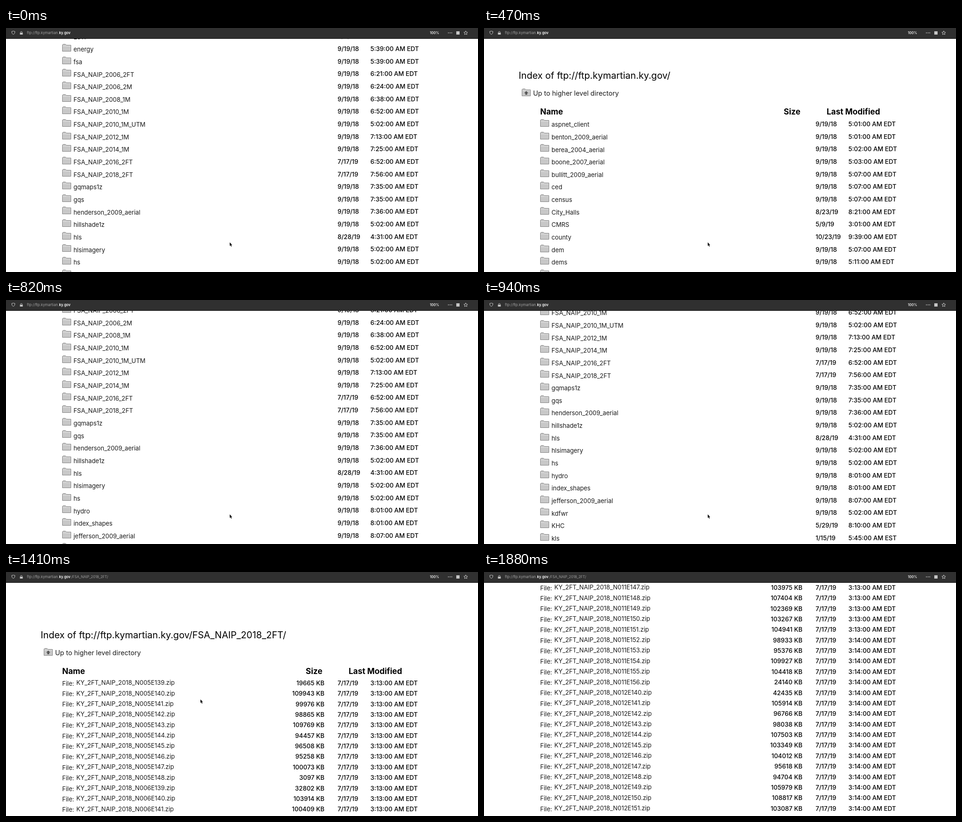
An HTML page with a canvas that plays this animation: 1000 px wide and 519 px high, repeating every 2.94 s.

```html
<!DOCTYPE html>
<html lang="en">
<head>
<meta charset="utf-8">
<title>Directory listing</title>
<style>
html, body { margin: 0; width: 100%; height: 100%; overflow: hidden; background: #fff; }
canvas { display: block; width: 1000px; height: 519px; }
</style>
</head>
<body>
<canvas id="stage" width="1000" height="519"></canvas>
<script>
const ctx = document.getElementById('stage').getContext('2d');
const LOOP = 2940, TICK = LOOP / 50, BAR = 23, FONT = 'Inter, Roboto, sans-serif';
const INK = '#000', LINK = '#1a1a1a', PALE = '#c4c4c4';
const ROOT = 'ftp.kymartian.', HOST = 'ky.gov', FOLDER = 'FSA_NAIP_2018_2FT';

// name, time, optional date, optional zone
const folders = `aspnet_client 5:01
benton_2009_aerial 5:01
berea_2004_aerial 5:02
boone_2007_aerial 5:03
bullitt_2009_aerial 5:07
ced 5:07
census 5:07
City_Halls 8:21 8/23/19
CMRS 3:01 5/9/19
county 9:39 10/23/19
dem 5:07
dems 5:11
dlg 5:02
doq 5:02
doqcnty 5:02
doqq2002 5:02
doqsid 5:02
doq_phase2_sid 5:01
dor 5:35
drg 5:02
drg100k 5:39
drg250k 5:02
drg_utm 5:02
E911 7:49 9/3/19
energy 5:39
fsa 5:39
FSA_NAIP_2006_2FT 6:21
FSA_NAIP_2006_2M 6:24
FSA_NAIP_2008_1M 6:38
FSA_NAIP_2010_1M 6:52
FSA_NAIP_2010_1M_UTM 5:02
FSA_NAIP_2012_1M 7:13
FSA_NAIP_2014_1M 7:25
FSA_NAIP_2016_2FT 6:52 7/17/19
FSA_NAIP_2018_2FT 7:56 7/17/19
gqmaps1z 7:35
gqs 7:35
henderson_2009_aerial 7:36
hillshade1z 5:02
hls 4:31 8/28/19
hlsimagery 5:02
hs 5:02
hydro 8:01
index_shapes 8:01
jefferson_2009_aerial 8:07
kdfwr 5:02
KHC 8:10 5/29/19
kls 5:45 1/15/19 EST`.split('\n').map(line => {
  const [name, time, date = '9/19/18', zone = 'EDT'] = line.split(' ');
  return { name, date, time: `${time}:00 AM ${zone}` };
});

// Map tiles: each band to the north reaches a little further east; border tiles are small
function buildFiles() {
  const list = [];
  let seed = 7;
  for (let north = 5; north <= 12; north++) {
    const first = Math.max(139, north + 128);
    const last = Math.round(152 + (north - 8) * 4 / 3);
    for (let east = first; east <= last; east++) {
      seed = (seed * 16807) % 2147483647;
      const border = east === first || east === last;
      const size = border ? 16 + seed % 49000 : 93700 + seed % 16500;
      const minute = north * 1000 + east > 11151 ? 14 : 13;
      list.push({
        name: `KY_2FT_NAIP_2018_N${String(north).padStart(3, '0')}E${east}.zip`,
        size: size + ' KB',
        date: '7/17/19',
        time: `3:${minute}:00 AM EDT`
      });
    }
  }
  return list;
}
const files = buildFiles();

// Key points: [tick, value, ...], straight between them
const folderScroll = [[2, 799.6], [5, -33], [7, -33], [8, 0], [11, 561.7], [14, 876], [16, 950.8]];
const fileScroll = [[25, -33], [28, 974], [32, 2139.5]];
const pointer = [[16, 474, 456], [20, 240, 151], [22, 240, 151], [25, 498, 331]];
const OPEN = 22, END = 32;

function track(keys, tick) {
  const next = keys.findIndex(k => k[0] > tick);
  if (next === 0) return keys[0].slice(1);
  if (next < 0) return keys[keys.length - 1].slice(1);
  const a = keys[next - 1], b = keys[next], u = (tick - a[0]) / (b[0] - a[0]);
  return a.map((v, i) => v + (b[i] - v) * u).slice(1);
}

function text(str, x, y, size, color = INK, weight = 400, align = 'left') {
  ctx.font = `${weight} ${size}px ${FONT}`;
  ctx.fillStyle = color;
  ctx.textAlign = align;
  ctx.fillText(str, x, y);
}

function shape(...points) {
  ctx.beginPath();
  points.forEach(p => ctx.lineTo(...p));
  ctx.closePath();
}

function folderIcon(x, y, up) {
  ctx.save();
  ctx.translate(x, y);
  shape([.5, 15.5], [.5, 2], [2, .5], [7, .5], [9, 2.5], [18.5, 2.5], [18.5, 15.5]);
  ctx.fillStyle = '#c8c8c8';
  ctx.fill();
  ctx.strokeStyle = '#858585';
  ctx.lineWidth = 1;
  ctx.stroke();
  ctx.fillStyle = '#e2e2e2';
  ctx.fillRect(1, 4, 17, 1);
  if (up) {
    ctx.fillStyle = '#555';
    shape([9.5, 5], [14, 9.5], [5, 9.5]);
    ctx.fill();
    ctx.fillRect(7.5, 9, 4, 4);
  }
  ctx.restore();
}

function heading(path, s) {
  text(`Index of ftp://${ROOT}${HOST}/${path}`, 73.5, 108 - s, 19.7);
  folderIcon(80, Math.round(129 - s), true);
  text('Up to higher level directory', 104, 144 - s, 14.2, LINK);
  text('Name', 119, 183.5 - s, 17, INK, 700);
  text('Size', 635, 183.5 - s, 17, INK, 700);
  text('Last Modified', 726, 183.5 - s, 17, INK, 700);
}

function stamp(row, y) {
  text(row.date, 702.5, y, 13.1, INK, 500);
  text(row.time, 772, y, 13.1, INK, 500);
}

function eachRow(rows, top, pitch, draw) {
  rows.forEach((row, i) => {
    const y = top + i * pitch;
    if (y > 0 && y < 545) draw(row, y);
  });
}

function folderPage(s) {
  heading('', s);
  eachRow(folders, 205 - s, 26.65, (row, y) => {
    folderIcon(119, Math.round(y - 11), false);
    text(row.name, 143, y + 5.2, 12.9, LINK);
    stamp(row, y + 4);
  });
}

function filePage(s) {
  heading(FOLDER + '/', s);
  eachRow(files, 203 - s, 22.38, (row, y) => {
    text('File:', 119, y + 5.7, 13, LINK);
    text(row.name, 149, y + 4.2, 12.9, LINK);
    text(row.size, 674.5, y + 4.8, 13.1, INK, 500, 'right');
    stamp(row, y + 4.8);
  });
}

function toolbar(path) {
  ctx.fillStyle = '#303030';
  ctx.fillRect(0, 0, 1000, BAR);
  ctx.fillStyle = '#0c0c0c';
  ctx.fillRect(0, BAR - 1, 1000, 1);

  ctx.strokeStyle = ctx.fillStyle = PALE;
  ctx.lineWidth = 1;
  // shield
  ctx.beginPath();
  ctx.moveTo(12, 7.5);
  ctx.lineTo(15.5, 6.5);
  ctx.lineTo(19, 7.5);
  ctx.quadraticCurveTo(19, 12, 15.5, 14);
  ctx.quadraticCurveTo(12, 12, 12, 7.5);
  ctx.stroke();
  // lock
  ctx.fillRect(29.5, 10, 6, 4);
  ctx.beginPath();
  ctx.arc(32.5, 9.5, 2, Math.PI, 0);
  ctx.stroke();

  text('ftp://' + ROOT, 112, 13, 7.7, '#a0a0a0', 400, 'right');
  text(HOST, 112.5, 13, 7.4, '#fff', 600);
  if (path) text(`/${path}/`, 138, 13, 7.5, '#a0a0a0');
  text('100%', 898, 13, 7.2, '#eee', 600);

  ctx.fillStyle = PALE;
  for (let i = 0; i < 3; i++) ctx.fillRect(936.5 + i * 3.5, 9.5, 1.7, 1.7);
  ctx.fillRect(954, 7, 7, 7);
  // star
  ctx.beginPath();
  for (let i = 0; i < 10; i++) {
    const a = -Math.PI / 2 + i * Math.PI / 5, r = i % 2 ? 2 : 4.3;
    ctx.lineTo(974 + r * Math.cos(a), 10.5 + r * Math.sin(a));
  }
  ctx.closePath();
  ctx.stroke();
}

function arrow(x, y) {
  ctx.save();
  ctx.translate(x, y);
  shape([0, 0], [0, 7.5], [1.7, 6], [3, 9], [4.2, 8.4], [3, 5.6], [5.2, 5.4]);
  ctx.strokeStyle = '#fff';
  ctx.lineWidth = 1.4;
  ctx.stroke();
  ctx.fillStyle = INK;
  ctx.fill();
  ctx.restore();
}

function render(t) {
  // small lead so that a step is in place at its rounded time
  const tick = Math.floor((t + 5) / TICK) % 50;
  const opened = tick >= OPEN;
  ctx.fillStyle = '#fff';
  ctx.fillRect(0, 0, 1000, 519);
  if (opened) filePage(track(fileScroll, tick)[0]);
  else folderPage(track(folderScroll, tick)[0]);
  toolbar(opened ? FOLDER : '');
  if (tick < END) arrow(...track(pointer, tick));
}

const start = performance.now();
function frame() {
  render((performance.now() - start) % LOOP);
  requestAnimationFrame(frame);
}
frame();
</script>
</body>
</html>
```
